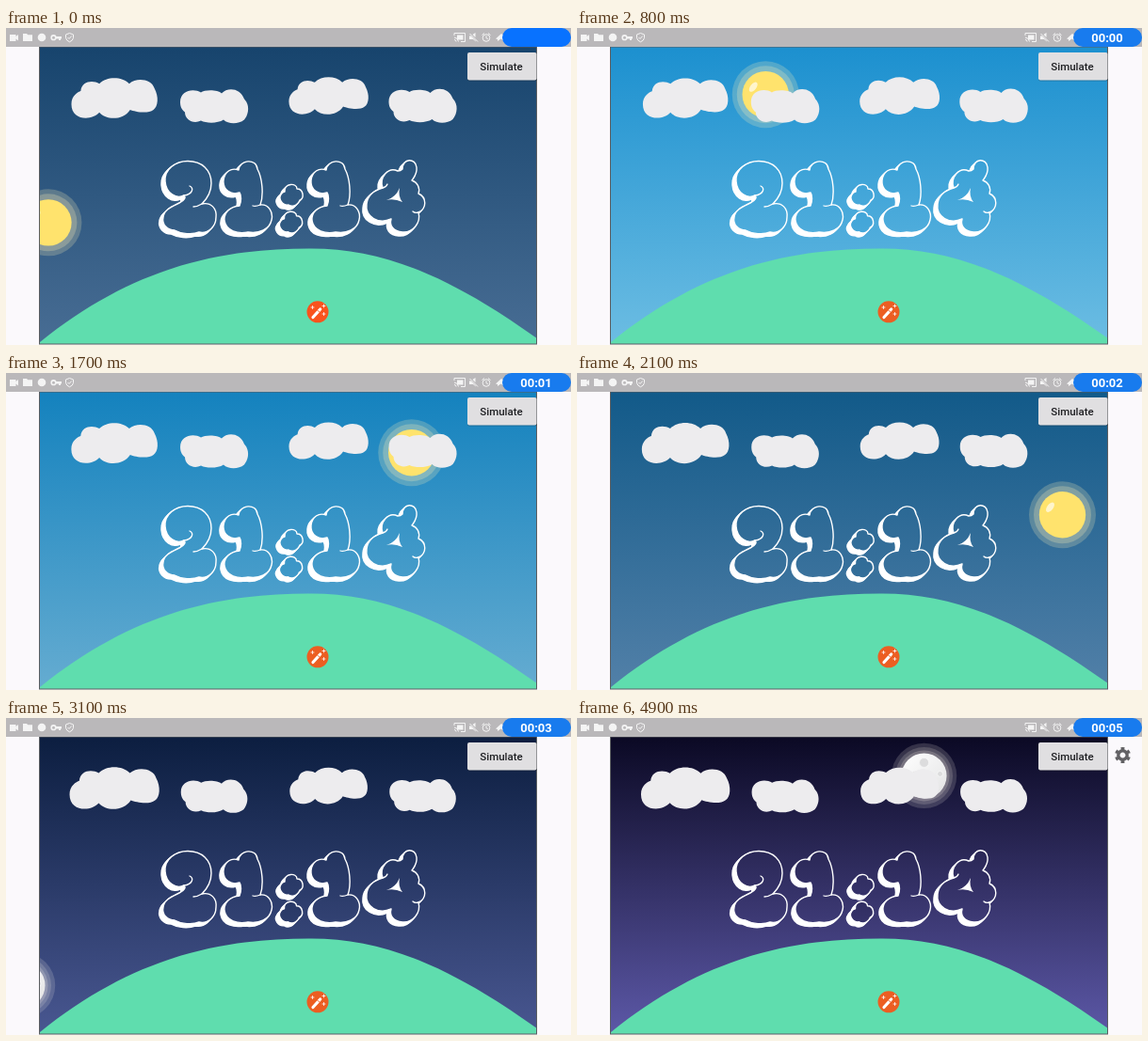
An HTML page for the animation above (5 s loop, 600 by 337 pixels).

```html
<!DOCTYPE html>
<html lang="en">
<head>
<meta charset="utf-8">
<title>Day and night clock</title>
<style>
  html, body { margin: 0; width: 100%; height: 100%; overflow: hidden; background: #fbf9fc; }
  svg { display: block; width: 100vw; height: 100vh; }
  text { font-family: Roboto, sans-serif; text-anchor: middle; }
  .face { fill: url(#sky); stroke: #fff; stroke-width: 1.4; stroke-linejoin: round; }
  .side { fill: #fff; stroke: #fff; stroke-width: 1.4; }
  .line { fill: none; stroke: #fff; stroke-width: 1.3; stroke-linecap: round; }
</style>
</head>
<body>
<svg viewBox="0 0 600 337" preserveAspectRatio="none">
  <defs>
    <linearGradient id="sky" gradientUnits="userSpaceOnUse" x1="0" y1="20" x2="0" y2="336">
      <stop id="top"/><stop id="low" offset="1"/>
    </linearGradient>
    <linearGradient id="moonlight" x1="0" y1="0" x2="1" y2="1">
      <stop stop-color="#fff"/><stop offset="1" stop-color="#e2e2e3"/>
    </linearGradient>
    <clipPath id="scene"><rect x="36" y="20" width="528" height="316"/></clipPath>
    <path id="longCloud" d="M-46 6C-46 -3 -39 -7 -36 -8C-35 -19 -23 -20 -16 -16C-8 -24 8 -24 16 -16C24 -23 40 -21 43 -11C48 -2 47 9 42 12C36 17 22 14 17 12C10 23 -8 24 -16 15C-24 24 -46 24 -46 6Z"/>
    <path id="roundCloud" d="M-36 -5C-36 -17 -22 -20 -14 -15C-10 -18 4 -18 8 -14C14 -21 28 -20 32 -8C38 -2 37 8 32 14C26 19 15 19 10 14C4 18 -8 18 -14 15C-22 19 -31 14 -31 6C-35 3 -36 -1 -36 -5Z"/>
    <path id="two" d="M169 163C168 150 180 141.500 193 141.500C208 141.500 218 151 218 165C218 175 214 181 208 187C218 185 224 192 223 201C223 211 215 219 205 217C198 220 186 219 179 215C172 215 165 209 167 201C168 193 176 190 184 186C190 183 191 180 189 178C181 182 170 176 169 163Z"/>
    <path id="one" d="M247 151C248 140 266 138 267 150C272 159 274 177 270 188C279 187 284 196 282 204C280 214 269 219 257 217C246 219 234 216 232 205C231 196 238 190 248 189C250 184 250 178 248 175C239 178 230 172 231 162C232 153 239 148 247 151Z"/>
    <path id="dot" d="M296 174C295 165 309 164 309 171C316 171 317 181 312 183C309 190 303 190 300 188C293 189 289 181 292 177C293 175 294 174 296 174Z"/>
    <path id="four" d="M421 150C421 138 435 138 436 148C437 155 433 159 431 162C437 164 440 170 438 176C447 180 447 192 438 196C441 207 432 218 421 217C411 216 407 210 409 203C396 209 381 201 383 187C384 177 393 172 400 170C396 159 406 147 416 152Q419 152 421 150Z"/>
  </defs>

  <rect width="600" height="337" fill="#fbf9fc"/>
  <g clip-path="url(#scene)">
    <rect x="36" y="20" width="528" height="316" fill="url(#sky)"/>
    <g id="sun">
      <circle r="35.500" fill="#ffefb8" opacity=".22"/>
      <circle r="30.500" fill="#ffefb8" opacity=".25"/>
      <circle r="24.700" fill="#ffe36d"/>
      <ellipse cx="-13" cy="-8" rx="6" ry="3.200" transform="rotate(-52 -13 -8)" fill="#fff" opacity=".65"/>
    </g>
    <g id="moon">
      <circle r="34.700" fill="#fff6ea" opacity=".16"/>
      <circle r="30.500" fill="#fff6ea" opacity=".16"/>
      <circle r="27" fill="#fff6ea" opacity=".2"/>
      <circle r="24" fill="url(#moonlight)"/>
      <g fill="#dcdcdd" stroke="#f6f6f6">
        <circle cx="0" cy="-14" r="5"/><circle cx="-10" cy="-2" r="3"/>
        <circle cx="5" cy="2" r="3.500"/><circle cx="17" cy="-2" r="3"/>
        <circle cx="3" cy="14" r="3"/><circle cx="-9" cy="9" r="1.500"/>
      </g>
    </g>
    <g id="clouds" fill="#edecee"></g>
    <path d="M36 334C130 258 220 234.500 322 234.500C400 234 470 263 564 330V337H36Z" fill="#5fddae"/>
  </g>
  <rect x="35.500" y="20" width="528" height="316" fill="none" stroke="#5a5d60"/>

  <g id="digits"></g>
  <path class="line" d="M189 178C198 177 200 170 195 168M208 187Q203 190 199 190M270 188Q265 190 262 189M363 188Q358 190 355 189M400 170Q404 169 405 166M438 196Q434 197 432 195"/>
  <path d="M404 183Q414 180 418 170Q416 179 421 185Q412 181 404 183Z" fill="#fff"/>

  <circle id="wand" cx="331" cy="301.800" r="11.500"/>
  <g stroke="#fff" fill="#fff" stroke-linecap="round">
    <path d="M326 307.500L333.700 299" stroke-width="3.200"/>
    <path d="M330.300 299.700L333.500 302.600" stroke="#ef5d22" stroke-width=".9"/>
    <path d="M325.500 295.500v3M324 297h3M337.500 294v3M336 295.500h3M337.500 302.500v3M336 304h3" fill="none" stroke-width=".8"/>
  </g>

  <rect x="490" y="27.500" width="74" height="29" rx="2" fill="#000" opacity=".22"/>
  <rect x="490" y="26" width="73.500" height="29.500" rx="2" fill="#e0dfe1"/>
  <text x="526" y="45" font-size="11.500" font-weight="500" fill="#202124">Simulate</text>

  <g id="gear" fill="none" stroke="#626164" transform="translate(579.500 39.500)">
    <circle r="4.700" stroke-width="3.400"/>
    <circle r="7" stroke-width="3" pathLength="12" stroke-dasharray="1 1" stroke-dashoffset="-.5"/>
  </g>

  <rect width="600" height="20" fill="#bab8ba"/>
  <g opacity=".85">
    <g fill="#fff">
      <path d="M4 7h6.500v2l2.500-2v6.500l-2.500-2v2.500H4Z"/>
      <path d="M18 6h4l1.200 1.300H28V14H18Z"/>
      <circle cx="38" cy="10" r="4.300"/>
      <path d="M53 9h6v2.500h-1v1.500h-2v-1.500h-3Z"/>
    </g>
    <g fill="none" stroke="#fff">
      <circle cx="50.500" cy="10.200" r="2.300" stroke-width="1.600"/>
      <path d="M67.500 5.500L71.500 7V10.500Q71 13.500 67.500 14.800Q64 13.500 63.500 10.500V7ZM65.500 10L67 11.500L69.700 8.500"/>
      <path d="M476 8V5.500H487.500V14.500H483M476 10Q480 10.500 480.500 14.500M476 12.500Q478 12.500 478 14.500"/>
      <rect x="479" y="7.500" width="6.500" height="5" fill="#fff" stroke="none"/>
      <path d="M492.500 6L501 14.500"/>
      <circle cx="510" cy="10.500" r="3.800"/><path d="M510 8.300V10.700L511.800 11.800M505.500 7.500L508 5.500M514.500 7.500L512 5.500"/>
    </g>
    <path d="M492 8.500h2l5 5.500v.5l-3-2.500h-4ZM495.500 7l3-2v5Z" fill="#fff"/>
    <path d="M520 11.500L526 6L529 8V14L525.500 11.500L522 14V12Z" fill="#fff"/>
  </g>
  <rect id="pill" x="527" width="73" height="20" rx="10"/>
  <text id="timer" x="563" y="14.800" font-size="13" font-weight="700" fill="#fff"></text>
</svg>
<script>
  const $ = id => document.getElementById(id);
  const LOOP = 5000, STEP = 100;
  const ORBIT = { x: 299.5, y: 340.5, r: 287.5 };

  // time, sun angle from straight up in degrees
  const turn = [[0, -62.3], [800, -20.2], [1400, 11], [2100, 48.7], [2500, 70.8], [3900, 141.9], [4900, 193.9]];
  // time, sky colour at the top, sky colour at the bottom
  const sky = [
    [0, 0x17446d, 0x486d94], [800, 0x1c90cf, 0x6cbde3], [1200, 0x16a1e6, 0x74d0f2],
    [1400, 0x16a0e5, 0x74cdf0], [2100, 0x125a89, 0x5280a8], [2500, 0x0f3058, 0x435f8a],
    [3900, 0x090720, 0x504d9a], [4900, 0x0b0924, 0x5c58a7]
  ];
  const mix = (a, b, k) => a + (b - a) * k;

  function span(keys, t) {
    let i = 0;
    while (i < keys.length - 2 && t >= keys[i + 1][0]) i++;
    const a = keys[i], b = keys[i + 1];
    return [a, b, (t - a[0]) / (b[0] - a[0])];
  }

  function blend(a, b, k) {
    const part = s => Math.round(mix(a >> s & 255, b >> s & 255, k));
    return `rgb(${part(16)},${part(8)},${part(0)})`;
  }

  // each glyph is a face with a white side reaching down and left
  const glyphs = [['two', 0, 0], ['one', 0, 0], ['dot', 0, 0], ['dot', -.5, 28.8], ['one', 93, 0], ['four', 0, 0]];
  $('digits').innerHTML = glyphs.map(([id, x, y]) => {
    let out = '';
    for (let i = 4; i >= 0; i--)
      out += `<use href="#${id}" x="${x - i}" y="${y + i}" class="${i ? 'side' : 'face'}"/>`;
    return out;
  }).join('');

  const clouds = [['long', 115, 75, 1], ['round', 221, 83.5, 1], ['long', 342.5, 72.5, .915], ['round', 442.5, 83, 1]];
  $('clouds').innerHTML = clouds.map(([kind]) => `<use href="#${kind}Cloud"/>`).join('');

  function place(el, deg) {
    const a = deg * Math.PI / 180;
    const x = ORBIT.x + ORBIT.r * Math.sin(a), y = ORBIT.y - ORBIT.r * Math.cos(a);
    el.setAttribute('transform', `translate(${x} ${y})`);
  }

  function draw(t) {
    const [a, b, k] = span(turn, t);
    const deg = mix(a[1], b[1], k);
    place($('sun'), deg);
    place($('moon'), deg - 180);

    const [p, q, m] = span(sky, t);
    $('top').setAttribute('stop-color', blend(p[1], q[1], m));
    $('low').setAttribute('stop-color', blend(p[2], q[2], m));

    const wave = Math.cos((t - 800) / 6000 * 2 * Math.PI);
    clouds.forEach(([, x, y, size], i) => {
      const s = size * (i ? .99 + .015 * wave : 1.01 - .03 * wave);
      $('clouds').children[i].setAttribute('transform', `translate(${x} ${y}) scale(${s})`);
    });

    const begun = t >= STEP;
    $('pill').setAttribute('fill', begun ? '#187bee' : '#0872ff');
    $('wand').setAttribute('fill', begun ? '#ec5e22' : '#f9531d');
    $('timer').textContent = begun ? '00:0' + Math.floor((t + STEP) / 1000) : '';
    $('gear').setAttribute('opacity', Math.max(0, Math.min(1, (t - 4600) / 200)));
  }

  function frame(now) {
    draw(Math.floor(now % LOOP / STEP) * STEP);
    requestAnimationFrame(frame);
  }
  draw(0);
  requestAnimationFrame(frame);
</script>
</body>
</html>
```
